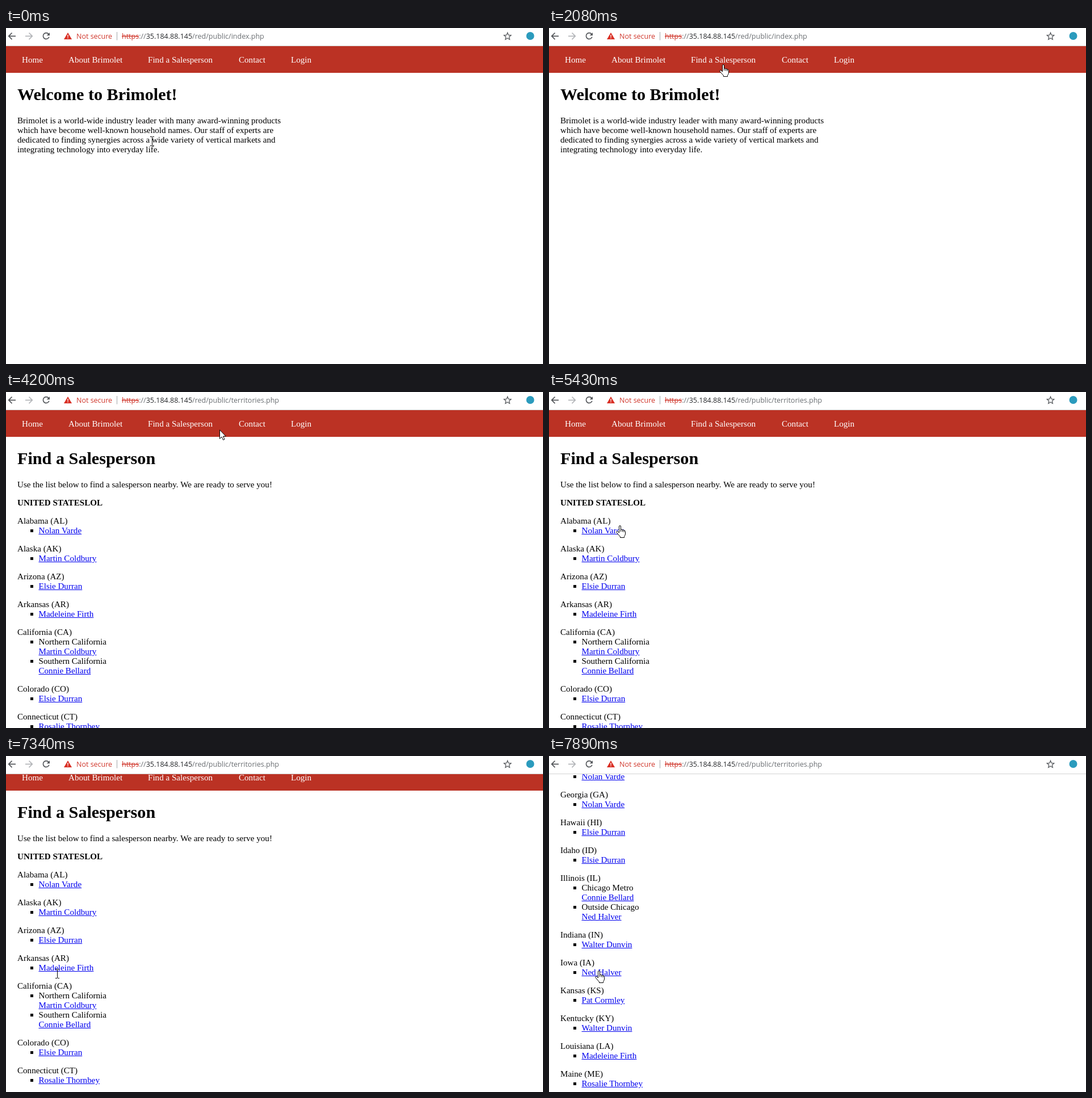
Recreate the animation shown at these times as an HTML page. Size 946 px wide and 592 px high, loop 8 s.

```html
<!DOCTYPE html>
<html lang="en">
<head>
<meta charset="utf-8">
<title>Find a Salesperson</title>
<style>
html, body { margin: 0; width: 946px; height: 592px; overflow: hidden; background: #fff; }
body { position: relative; font: 15.1px/17px "Liberation Serif", "Times New Roman", serif; color: #000; }
svg { position: absolute; left: 0; top: 0; }
#bar { font: 12.5px "Open Sans", sans-serif; }
#view { position: absolute; top: 32px; width: 946px; height: 560px; overflow: hidden; }
nav { position: relative; height: 47px; background: #bb3224; color: #fff; }
nav span { position: absolute; top: 16px; }
main { padding-left: 20px; white-space: nowrap; }
h1 { margin: 21px 0; font-size: 30.2px; line-height: 34px; }
p, ul { margin: 0 0 15px; }
dl, dt, dd { margin: 0; }
dd ul { padding-left: 37.5px; list-style: none; }
li { position: relative; }
li::before { content: ""; position: absolute; left: -14.5px; top: 6px; width: 5px; height: 5px; background: #000; }
a { color: #00e; text-decoration: underline; }
</style>
</head>
<body>
<div id="view">
  <div id="page">
    <nav>
      <span style="left:28px">Home</span>
      <span style="left:110px">About Brimolet</span>
      <span style="left:250px">Find a Salesperson</span>
      <span style="left:410px">Contact</span>
      <span style="left:502px">Login</span>
    </nav>
    <main id="home">
      <h1>Welcome to Brimolet!</h1>
      <p>Brimolet is a world-wide industry leader with many award-winning products<br>
      which have become well-known household names. Our staff of experts are<br>
      dedicated to finding synergies across a wide variety of vertical markets and<br>
      integrating technology into everyday life.</p>
    </main>
    <main id="list">
      <h1>Find a Salesperson</h1>
      <p>Use the list below to find a salesperson nearby. We are ready to serve you!</p>
      <p><b>UNITED STATESLOL</b></p>
      <dl id="states"></dl>
    </main>
  </div>
</div>

<svg id="bar" width="946" height="32">
  <path d="M0 0H946V32H0z" fill="#fff"/>
  <path d="M0 31.5H946" stroke="#d4d4d4"/>
  <g fill="none" stroke="#54575b" stroke-width="1.7">
    <path d="M17 14.3H5M10.5 8.5L4.7 14.3L10.5 20.1"/>
    <path d="M34 14.3H46M40.5 8.5L46.3 14.3L40.5 20.1" stroke="#b4b6b9"/>
    <g id="reload">
      <path d="M75 10.6A5.4 5.4 0 1 0 75.9 15.8"/>
      <path d="M77 8V13.3H71.7z" fill="#54575b" stroke="none"/>
    </g>
    <path id="stop" d="M65.7 9.2L75.9 19.4M75.9 9.2L65.7 19.4"/>
    <path d="M883.5 8.2l1.7 4.2 4.5.4-3.4 3 1 4.4-3.8-2.3-3.8 2.3 1-4.4-3.4-3 4.5-.4z" stroke-width="1.3"/>
  </g>
  <path d="M109 8L116 20H102z" fill="#d93025"/>
  <path d="M109 12V15.7M109 16.8V18.3" stroke="#fff" stroke-width="1.4"/>
  <path d="M195.5 7V21.5" stroke="#a5a8ab"/>
  <circle cx="923.5" cy="14" r="7" fill="#2b9bbd"/>
  <text x="124" y="19" fill="#d0362b">Not secure</text>
  <text x="204" y="19" fill="#6b6f73"><tspan fill="#d0362b" text-decoration="line-through">https</tspan>://<tspan fill="#26282b">35.184.88.145</tspan>/red/public/<tspan id="file"></tspan></text>
</svg>

<svg id="pointer" width="946" height="592">
  <g id="arrow"><path d="M.5 .8V16.3L4 13L6.5 18.5L9 17.4L6.6 12H11.3z" fill="#fff" stroke="#000"/></g>
  <g id="hand">
    <path d="M5.5 13V2Q5.5 .5 7 .5T8.5 2V7.5Q10.2 6.2 11.3 8Q13.2 7 14 9Q16 8.5 16.5 10.5V15Q16.5 17 14.5 19.5V21.5H7.5V20Q4 16 .8 12.2Q1 9.5 3.5 11z" fill="#fff" stroke="#000"/>
    <path d="M8.5 7.5V11M11.4 8V11.5M14.1 9V12" stroke="#000"/>
  </g>
  <g id="beam"><path d="M0 .5H3M4 .5H7M3.5 1V16M0 16.5H3M4 16.5H7" fill="none" stroke="#000"/></g>
</svg>

<script>
const $ = id => document.getElementById(id);
const LOOP = 8000;

const [nolan, martin, elsie, madeleine, connie, rosalie, ned, walter, pat] = [
  'Nolan Varde', 'Martin Coldbury', 'Elsie Durran', 'Madeleine Firth', 'Connie Bellard',
  'Rosalie Thornbey', 'Ned Halver', 'Walter Dunvin', 'Pat Cormley'];

// A state has either one salesperson or [region, salesperson] pairs.
const states = [
  ['Alabama (AL)', nolan],
  ['Alaska (AK)', martin],
  ['Arizona (AZ)', elsie],
  ['Arkansas (AR)', madeleine],
  ['California (CA)', ['Northern California', martin], ['Southern California', connie]],
  ['Colorado (CO)', elsie],
  ['Connecticut (CT)', rosalie],
  ['Delaware (DE)', rosalie],
  ['Florida (FL)', nolan],
  ['Georgia (GA)', nolan],
  ['Hawaii (HI)', elsie],
  ['Idaho (ID)', elsie],
  ['Illinois (IL)', ['Chicago Metro', connie], ['Outside Chicago', ned]],
  ['Indiana (IN)', walter],
  ['Iowa (IA)', ned],
  ['Kansas (KS)', pat],
  ['Kentucky (KY)', walter],
  ['Louisiana (LA)', madeleine],
  ['Maine (ME)', rosalie],
];
const link = name => `<a>${name}</a>`;
const item = entry => `<li>${Array.isArray(entry) ? entry[0] + '<br>' + link(entry[1]) : link(entry)}</li>`;
$('states').innerHTML = states.map(([state, ...people]) =>
  `<dt>${state}</dt><dd><ul>${people.map(item).join('')}</ul></dd>`).join('');

const moves = [
  [0, 'beam', 254, 191], [130, 'arrow', 177, 255], [270, 'arrow', 205, 286], [400, 'beam', 151, 160],
  [550, 'arrow', 172, 138], [680, 'beam', 158, 110], [830, 'hand', 157, 67], [980, 'hand', 142, 52],
  [1680, 'hand', 152, 54], [1830, 'hand', 186, 60], [1955, 'hand', 254, 63], [2080, 'hand', 300, 64],
  [4200, 'arrow', 376, 66], [4350, 'arrow', 388, 65], [4475, 'arrow', 397, 65], [4600, 'arrow', 396, 65],
  [4750, 'arrow', 388, 72], [4890, 'arrow', 310, 130], [5020, 'arrow', 221, 193],
  [5160, 'arrow', 168, 216], [5290, 'arrow', 136, 228], [5430, 'hand', 118, 235],
  [5555, 'hand', 105, 239], [5680, 'hand', 100, 241], [6980, 'arrow', 106, 271],
  [7100, 'arrow', 98, 315], [7220, 'beam', 88, 365], [7340, 'beam', 87, 375], [7760, 'hand', 81, 378],
];
const scrolls = [[0, 0], [7340, 18], [7490, 213], [7610, 363], [7760, 525], [7890, 651]];
const latest = (steps, t) => steps.filter(step => step[0] <= t).pop();
const show = (id, on) => { $(id).style.display = on ? '' : 'none'; };

function draw(t) {
  const loading = t >= 2890 && t < 3620;
  const arrived = t >= 3620;
  show('home', !arrived);
  show('list', arrived);
  show('stop', loading);
  show('reload', !loading);
  $('file').textContent = t < 3490 ? 'index.php' : 'territories.php';
  $('page').style.transform = `translateY(${-latest(scrolls, t)[1]}px)`;

  const [, shape, x, y] = latest(moves, t);
  for (const id of ['arrow', 'hand', 'beam']) show(id, id === shape);
  $(shape).setAttribute('transform', `translate(${x} ${y})`);
}

const start = performance.now();
function tick() {
  draw((performance.now() - start) % LOOP);
  requestAnimationFrame(tick);
}
tick();
</script>
</body>
</html>
```
